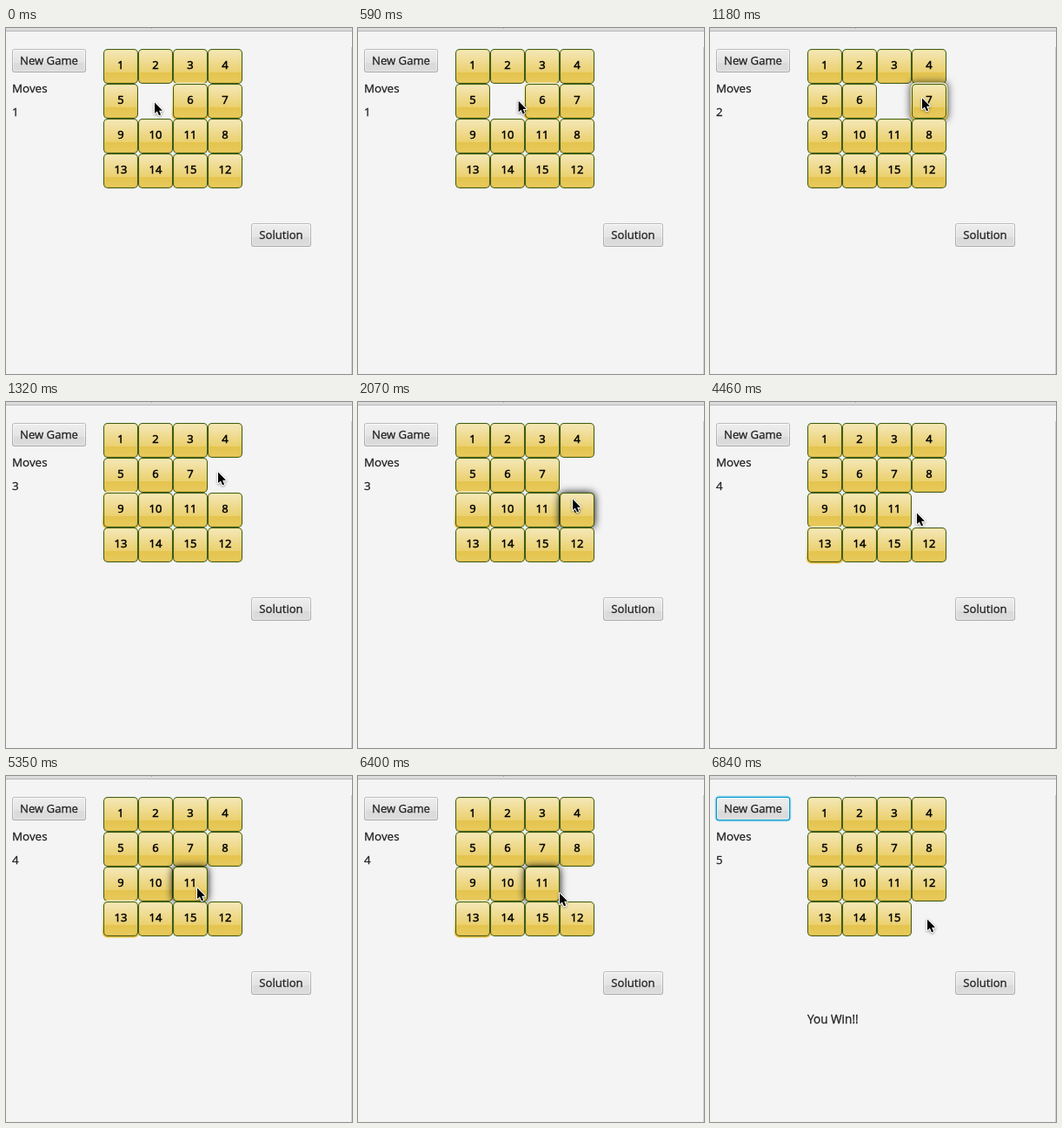
Animation of 398 by 397 pixels, one loop 8 s. Source, as an HTML page with a canvas:

```html
<!DOCTYPE html>
<html lang="en">
<head>
<meta charset="utf-8">
<title>Sliding puzzle</title>
<style>
  html, body { margin: 0; width: 100%; height: 100%; overflow: hidden; background: #f4f4f4; }
  canvas { display: block; width: 398px; height: 397px; }
</style>
</head>
<body>
<canvas id="stage" width="398" height="397"></canvas>
<script>
const ctx = document.getElementById('stage').getContext('2d');
const LOOP = 8000, TICK = 145, PRESS = 150;
const CELL = 40, LEFT = 112, TOP = 24;
const START = [1, 2, 3, 4, 5, 0, 6, 7, 9, 10, 11, 8, 13, 14, 15, 12];

// Each click slides a tile and hands the focus on (0 = New Game button)
const CLICKS = [
  { at: 740, tile: 6, next: 7 },
  { at: 1320, tile: 7, next: 9 },
  { at: 3410, tile: 8, next: 13 },
  { at: 6840, tile: 12, next: 0 }
];

// Cursor glides, one even step per tick
const GLIDES = [
  { at: 0, steps: 1, x: 170, y: 84 },
  { at: 450, steps: 3, x: 211, y: 79 },
  { at: 1030, steps: 2, x: 243, y: 79 },
  { at: 1770, steps: 3, x: 246, y: 110 },
  { at: 2220, steps: 2, x: 249, y: 125 },
  { at: 4460, steps: 1, x: 237, y: 126 },
  { at: 4610, steps: 3, x: 219, y: 127 },
  { at: 5650, steps: 3, x: 224, y: 129 },
  { at: 6400, steps: 1, x: 231, y: 133 },
  { at: 6550, steps: 3, x: 249, y: 163 }
];

function cursorAt(t) {
  let { x, y } = GLIDES[0];
  for (const g of GLIDES) {
    if (t < g.at) break;
    const k = Math.min(1, (Math.floor((t - g.at) / TICK) + 1) / g.steps);
    x += (g.x - x) * k;
    y += (g.y - y) * k;
  }
  return { x, y };
}

function gameAt(t) {
  const board = START.slice();
  let focus = 6, moves = 1;
  for (const c of CLICKS) {
    if (t >= c.at - PRESS) focus = c.tile;
    if (t < c.at) break;
    const from = board.indexOf(c.tile);
    board[board.indexOf(0)] = c.tile;
    board[from] = 0;
    focus = c.next;
    moves++;
  }
  return { board, focus, moves };
}

function vertical(y, h, ...stops) {
  const g = ctx.createLinearGradient(0, y, 0, y + h);
  for (const [at, color] of stops) g.addColorStop(at, color);
  return g;
}

function box(x, y, w, h, r, fill) {
  ctx.beginPath();
  ctx.roundRect(x, y, w, h, r);
  ctx.fillStyle = fill;
  ctx.fill();
}

// A box grown (or shrunk, if negative) on every side
function grown(x, y, w, h, by, r, fill) {
  box(x - by, y - by, w + 2 * by, h + 2 * by, r, fill);
}

function label(text, x, y, size = 13.4, align = 'left', color = '#222', weight = .3) {
  ctx.font = `${size}px "Open Sans", "Noto Sans", sans-serif`;
  ctx.textAlign = align;
  ctx.fillStyle = ctx.strokeStyle = color;
  ctx.lineWidth = weight;
  ctx.fillText(text, x, y);
  ctx.strokeText(text, x, y);
}

function button(text, x, y, w, focused) {
  const h = 27;
  if (focused) {
    grown(x, y, w, h, 1.4, 4.5, 'rgba(3,158,211,.25)');
    grown(x, y, w, h, .3, 3.5, '#039ed3');
  } else {
    box(x, y, w, h, 3, vertical(y, h, [0, '#bdbdbd'], [1, '#a9a9a9']));
  }
  grown(x, y, w, h, -1, 2, vertical(y, h, [0, '#fcfcfc'], [1, '#e6e6e6']));
  grown(x, y, w, h, -2, 1.5,
    vertical(y + 2, h - 4, [0, '#ededed'], [.6, '#e3e3e3'], [.6, '#dadada'], [1, '#dcdcdc']));
  label(text, x + w / 2, y + 18, 13.1, 'center');
}

function tile(n, x, y, hover, focused) {
  const layer = (by, r, fill) => grown(x, y, CELL, CELL, by, r, fill);
  if (hover) {
    ctx.save();
    ctx.shadowColor = focused ? 'rgba(0,0,0,.75)' : '#000';
    ctx.shadowBlur = 10;
    layer(focused ? 1.4 : 0, 5, '#3f5a17');
    ctx.restore();
  }
  if (focused) layer(1.4, 6, vertical(y, CELL, [0, '#f4eecb'], [.6, '#f2e2a4'], [1, '#efc044']));
  layer(0, 5, '#3c5c18');
  layer(-1, 4, vertical(y, CELL, [0, '#f3e3a0'], [1, '#dcb945']));
  layer(-2, 3, vertical(y + 2, 36,
    [0, '#f4e7b6'], [.5, '#edd681'], [.7, '#ead06f'], [.7, '#e5c44d'], [1, '#e7c95c']));
  label(n, x + CELL / 2, y + 23, 13, 'center', '#000', .5);
}

function cursor(x, y) {
  const arrow = new Path2D('M0 0V12.6L2.9 9.9L5 14.8L7.1 13.9L5.1 9.2H9Z');
  ctx.save();
  ctx.translate(x + 1, y + 1.5);
  ctx.lineJoin = 'round';
  ctx.lineWidth = 2;
  ctx.strokeStyle = '#fff';
  ctx.shadowColor = 'rgba(0,0,0,.4)';
  ctx.shadowBlur = 3;
  ctx.shadowOffsetY = 1;
  ctx.stroke(arrow);
  ctx.shadowColor = 'transparent';
  ctx.fillStyle = '#000';
  ctx.fill(arrow);
  ctx.restore();
}

function windowFrame() {
  box(0, 0, 398, 397, 0, '#f4f4f4');
  box(0, 0, 398, 3, 0, '#dcdcdc');
  box(0, 3, 398, 1, 0, '#b6b6b6');
  box(167, 0, 1, 1, 0, '#a8a8a8');
  box(397, 22, 1, 375, 0, '#cccccc');
}

function draw(t) {
  const mouse = cursorAt(t), { board, focus, moves } = gameAt(t);
  windowFrame();
  button('New Game', 7, 24, 85, focus === 0);
  button('Solution', 282, 224, 69, false);
  label('Moves', 7, 74);
  label(moves, 7, 101);
  board.forEach((n, i) => {
    if (!n) return;
    const x = LEFT + i % 4 * CELL, y = TOP + Math.floor(i / 4) * CELL;
    const hover = mouse.x >= x && mouse.x < x + CELL && mouse.y >= y && mouse.y < y + CELL;
    tile(n, x, y, hover, n === focus);
  });
  if (moves > CLICKS.length) label('You Win!!', 112, 284, 13.6);
  cursor(mouse.x, mouse.y);
}

const begin = performance.now();
function frame() {
  draw((performance.now() - begin) % LOOP);
  requestAnimationFrame(frame);
}
frame();
</script>
</body>
</html>
```
